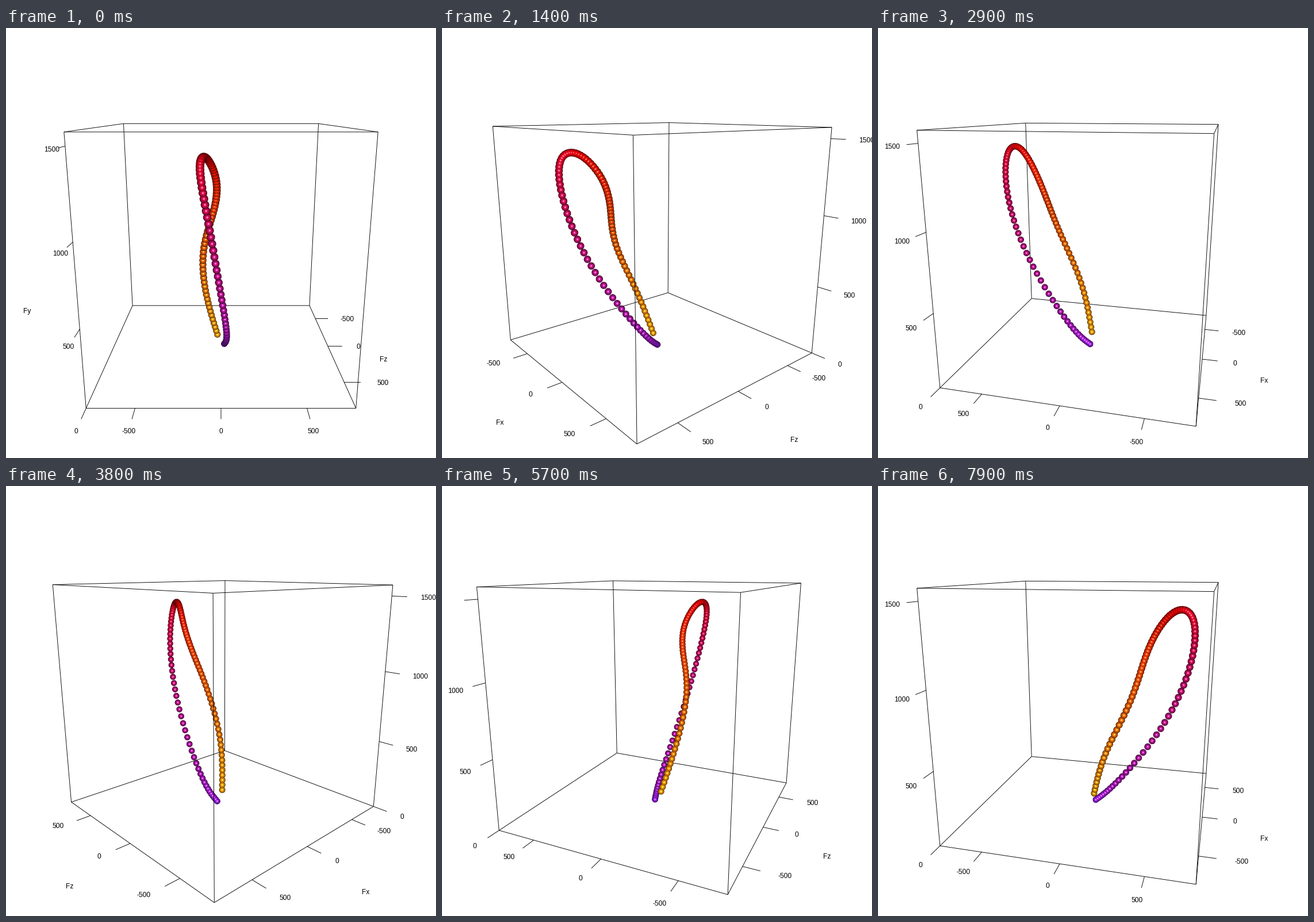
Recreate the animation shown at these times as a matplotlib script. Size 748 px wide and 748 px high, loop 8 s.

```python
import numpy as np
import matplotlib.pyplot as plt
from matplotlib.animation import FuncAnimation
from matplotlib.collections import LineCollection

SIZE, DPI = 748, 100
FRAMES, INTERVAL = 80, 100
TURN = np.radians(3.6)                      # spin per frame
C, S = np.cos(np.radians(15)), np.sin(np.radians(15))
FOCAL, DIST = 864, 4.388
HALF = 785                                  # half box side in data units
MARK = 2 / 15                               # tick length
RADIUS = 0.0295
FONT = 12
BEAD_COUNT = 101

# evenly spaced key points of the force curve, in box units
PATH = np.array([
    (-.033, -.871, .019), (-.128, -.430, .148), (-.143, .018, .343),
    (-.062, .360, .445), (-.035, .620, .543), (-.102, .806, .702),
    (-.143, .742, .843), (-.088, .361, .830), (-.009, -.204, .606),
    (.049, -.752, .231), (.030, -.965, .020)])


def spline(v, count):
    """Natural cubic spline through evenly spaced key points."""
    n = len(v)
    a, b = np.eye(n), np.zeros_like(v)
    for i in range(1, n - 1):
        a[i, i - 1:i + 2] = 1, 4, 1
        b[i] = 6 * (v[i - 1] - 2 * v[i] + v[i + 1])
    m = np.linalg.solve(a, b)
    q = np.linspace(0, n - 1, count)
    k = np.minimum(q.astype(int), n - 2)
    t = (q - k)[:, None]
    u = 1 - t
    return (u * v[k] + t * v[k + 1]
            + ((u**3 - u) * m[k] + (t**3 - t) * m[k + 1]) / 6)


BEADS = spline(PATH, BEAD_COUNT)
ORANGE, RED, PURPLE = np.array([(255, 165, 0), (255, 0, 0), (160, 32, 240)]) / 255
part = np.linspace(0, 2, BEAD_COUNT)[:, None]
COLORS = np.where(part < 1, ORANGE + (RED - ORANGE) * part,
                  RED + (PURPLE - RED) * (part - 1))

CORNERS = [(-1, -1), (1, -1), (1, 1), (-1, 1)]
EDGES = [((x, -1, z), (x, 1, z)) for x, z in CORNERS]
for (x0, z0), (x1, z1) in zip(CORNERS, CORNERS[1:] + CORNERS[:1]):
    EDGES += [((x0, y, z0), (x1, y, z1)) for y in (-1, 1)]
EDGES = np.array(EDGES, float)


def project(p, th):
    """Screen x, screen y and eye distance of box points."""
    x, y, z = np.moveaxis(np.asarray(p, float), -1, 0)
    ex = x * np.cos(th) - z * np.sin(th)
    ez = x * np.sin(th) + z * np.cos(th)
    d = DIST - S * y - C * ez
    mid = SIZE / 2
    return mid + FOCAL * ex / d, mid - FOCAL * (C * y - S * ez) / d, d


# bead raster window and supersampling
X0, X1, Y0, Y1, SS = 170, 578, 180, 572, 3


def render_beads(th):
    w, h = (X1 - X0) * SS, (Y1 - Y0) * SS
    depth = np.full((h, w), np.inf, np.float32)
    facing = np.zeros((h, w), np.float32)
    owner = np.full((h, w), -1, np.int16)
    px, py, dist = project(BEADS, th)
    for i, (x, y, d) in enumerate(zip((px - X0) * SS, (py - Y0) * SS, dist)):
        r = FOCAL * RADIUS / d * SS
        xa, xb = int(x - r), int(x + r) + 2
        ya, yb = int(y - r), int(y + r) + 2
        gx = np.arange(xa, xb) + .5 - x
        gy = np.arange(ya, yb)[:, None] + .5 - y
        q = 1 - (gx**2 + gy**2) / r**2
        nz = np.sqrt(np.clip(q, 0, 1))
        win = np.s_[ya:yb, xa:xb]
        near = d - RADIUS * nz
        hit = (q > 0) & (near < depth[win])
        depth[win][hit] = near[hit]
        facing[win][hit] = nz[hit]
        owner[win][hit] = i
    hit = owner >= 0
    nz = facing[hit][:, None]
    rgba = np.zeros((h, w, 4), np.float32)
    rgba[hit, :3] = np.clip(COLORS[owner[hit]] * nz + .7 * nz**50, 0, 1)
    rgba[hit, 3] = 1
    out = rgba.reshape(h // SS, SS, w // SS, SS, 4).mean(axis=(1, 3))
    out[..., :3] /= np.maximum(out[..., 3:], 1e-6)
    return out


def axes_layout(th):
    """Edge point, outward direction and side offset of the x, y, z axes."""
    sn, cs = np.sin(th + 1e-4), np.cos(th + 1e-4)
    sx, sz = np.sign(sn), np.sign(cs)
    down = (0, -1, 0)
    if abs(sn) > abs(cs):
        upright = (1, (sx, 0, -sz), (sx, 0, 0), (0, 0, -sz))
    else:
        upright = (1, (-sx, 0, sz), (0, 0, sz), (-sx, 0, 0))
    rows = [(0, (0, -1, sz), (0, 0, sz), down), upright,
            (2, (sx, -1, 0), (sx, 0, 0), down)]
    return [(k, *map(np.array, r)) for k, *r in rows]


def text_width(s):
    advance = {"-": .333, "F": .611, "x": .5, "y": .5, "z": .5}
    return FONT * sum(advance.get(c, .556) for c in s)


fig = plt.figure(figsize=(SIZE / DPI, SIZE / DPI), dpi=DPI, facecolor="white")
ax = fig.add_axes([0, 0, 1, 1])
ax.axis("off")
image = ax.imshow(np.zeros((Y1 - Y0, X1 - X0, 4)), extent=(X0, X1, Y1, Y0),
                  aspect="auto", interpolation="nearest", zorder=2)
ax.set_xlim(0, SIZE)
ax.set_ylim(SIZE, 0)
back, front = [ax.add_collection(LineCollection([], colors="black", linewidths=.65,
                                                snap=False, zorder=z)) for z in (1, 3)]
labels = [ax.text(0, 0, "", family="Liberation Sans", fontsize=FONT * 72 / DPI,
                  ha="left", va="baseline", zorder=4) for _ in range(13)]


def put(label, s, point, th, adj):
    x, y, _ = project(point, th)
    left, base = x - adj * text_width(s), y + 4.3
    label.set_text(s)
    label.set_position((left, base))
    label.set_visible(bool(0 <= left < SIZE and base < SIZE))


def screen_lines(segs, th):
    x, y, _ = project(segs, th)
    return np.stack([x, y], -1)


def update(n):
    th = n * TURN
    mid = EDGES.mean(axis=1)
    is_near = mid[:, 0] * np.sin(th) + mid[:, 2] * np.cos(th) > 0
    ticks, pool = [], iter(labels)
    for k, edge, out, side in axes_layout(th):
        shift = out[0] * np.cos(th) - out[2] * np.sin(th)
        for v in ((0, 500, 1000, 1500) if k == 1 else (-500, 0, 500)):
            p = edge.astype(float)
            p[k] = v / HALF - (k == 1)
            ticks.append((p, p + MARK * out))
            put(next(pool), str(v), p + 2 * MARK * out, th, (1 - shift) / 2)
        put(next(pool), "F" + "xyz"[k], edge + 4 * MARK * out + MARK * side, th, .5)
    back.set_segments(screen_lines(EDGES[~is_near], th))
    front.set_segments(screen_lines(np.concatenate([EDGES[is_near], ticks]), th))
    image.set_data(render_beads(th))
    return [back, image, front, *labels]


anim = FuncAnimation(fig, update, frames=FRAMES, interval=INTERVAL,
                     repeat=True, repeat_delay=0, blit=False)
plt.show()
```
